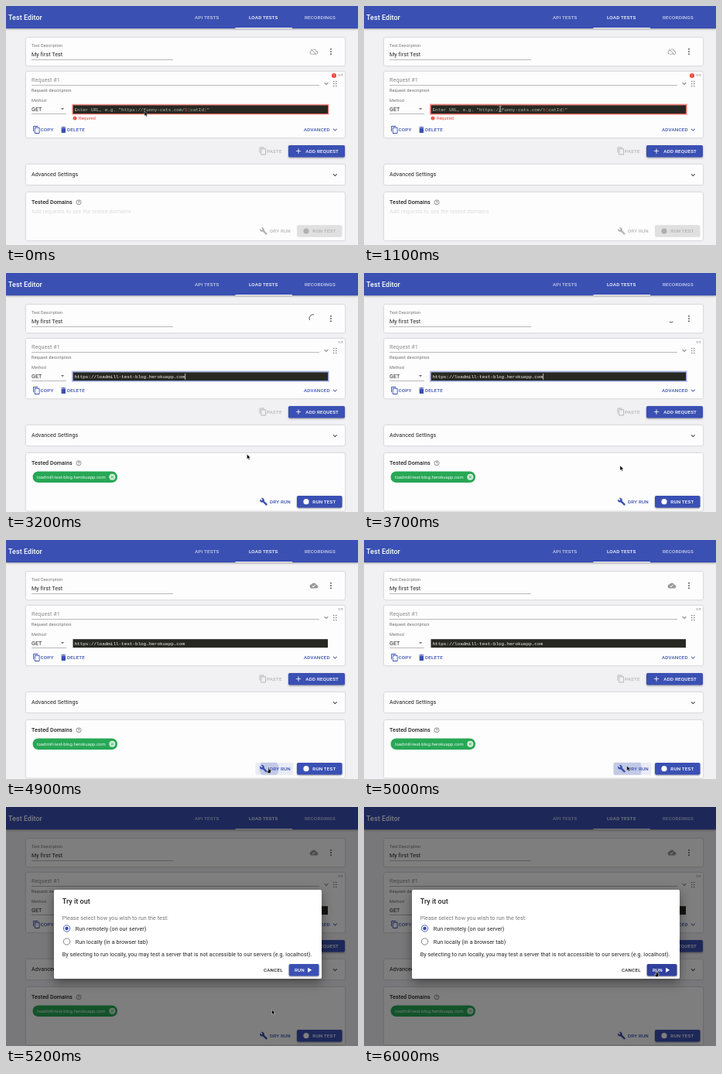
Write an HTML page that moves like this. It is 455 px wide and 309 px high and loops after 7000 ms.

```html
<!DOCTYPE html>
<html lang="en">
<head>
<meta charset="utf-8">
<title>Test Editor</title>
<style>
  html, body { margin: 0; width: 100%; height: 100%; overflow: hidden; background: #f1f0f3; }
  svg { display: block; width: 455px; height: 309px; }
  text { font-family: Roboto, Arial, sans-serif; white-space: pre; }
  .title { font-size: 8.95px; font-weight: 500; letter-spacing: .0075em; }
  .button { font-size: 6.26px; font-weight: 500; letter-spacing: .0286em; }
  .body { font-size: 7.14px; letter-spacing: .0094em; }
  .strong { font-weight: 500; }
  .label { font-size: 5.45px; letter-spacing: .0094em; }
  .caption { font-size: 5.45px; letter-spacing: .0333em; }
  .chip { font-size: 5.95px; }
  .tiny { font-size: 4.2px; }
  .code { font: 5.95px "Liberation Mono", "DejaVu Sans Mono", monospace; }
  .card { fill: #fdfdfd; filter: drop-shadow(0 .6px .8px rgba(0, 0, 0, .25)); }
  .raised { filter: drop-shadow(0 1px 1px rgba(0, 0, 0, .35)); }
  .dialog { fill: #fff; filter: drop-shadow(0 5px 7px rgba(0, 0, 0, .4)); }
</style>
</head>
<body>
<svg id="stage" viewBox="0 0 455 309"></svg>
<script>
const LOOP = 7000, STEP = 100;
const BLUE = '#3a50b3', INK = '#222', GREY = '#757575', PALE = '#b5b5b5', RED = '#ea4335';
const URL_TEXT = 'https://loadmill-test-blog.herokuapp.com';

const ICONS = {
  chevron: 'M16.6 8.6L12 13.2 7.4 8.6 6 10l6 6 6-6z',
  copy: 'M16 1H4c-1.1 0-2 .9-2 2v14h2V3h12V1zm3 4H8c-1.1 0-2 .9-2 2v14c0 1.1.9 2 2 2h11c1.1 0 2-.9 2-2V7c0-1.1-.9-2-2-2zm0 16H8V7h11v14z',
  trash: 'M6 19c0 1.1.9 2 2 2h8c1.1 0 2-.9 2-2V7H6v12zM19 4h-3.5l-1-1h-5l-1 1H5v2h14V4z',
  plus: 'M19 13h-6v6h-2v-6H5v-2h6V5h2v6h6v2z',
  play: 'M8 5v14l11-7z',
  drop: 'M7 10l5 5 5-5z',
  wrench: 'M22.7 19l-9.1-9.1c.9-2.3.4-5-1.5-6.9-2-2-5-2.4-7.4-1.3L9 6 6 9 1.6 4.7C.4 7.1.9 10.1 2.9 12.1c1.9 1.9 4.6 2.4 6.9 1.5l9.1 9.1c.4.4 1 .4 1.4 0l2.3-2.3c.5-.4.5-1.1.1-1.4z',
  cloudOff: 'M19.35 10.04C18.67 6.59 15.64 4 12 4c-1.48 0-2.85.43-4.01 1.17l1.46 1.46C10.21 6.23 11.08 6 12 6c3.04 0 5.5 2.46 5.5 5.5v.5H19c1.66 0 3 1.34 3 3 0 1.13-.64 2.11-1.56 2.62l1.45 1.45C23.16 18.16 24 16.68 24 15c0-2.64-2.05-4.78-4.65-4.96zM3 5.27l2.75 2.74C2.56 8.15 0 10.77 0 14c0 3.31 2.69 6 6 6h11.73l2 2L21 20.73 4.27 4 3 5.27zM7.73 10l8 8H6c-2.21 0-4-1.79-4-4s1.79-4 4-4h1.73z',
  cloudDone: 'M19.35 10.04C18.67 6.59 15.64 4 12 4 9.11 4 6.6 5.64 5.35 8.04 2.34 8.36 0 10.91 0 14c0 3.31 2.69 6 6 6h13c2.76 0 5-2.24 5-5 0-2.64-2.05-4.78-4.65-4.96zM10 17l-3.5-3.5 1.41-1.41L10 14.17 15.18 9l1.41 1.41L10 17z'
};

const text = (x, y, style, content, fill = INK) =>
  `<text x="${x}" y="${y}" class="${style}" fill="${fill}">${content}</text>`;
const rect = (x, y, w, h, fill, extra = '') =>
  `<rect x="${x}" y="${y}" width="${w}" height="${h}" fill="${fill}" ${extra}/>`;
const card = (y, h, id = '') =>
  `<rect ${id && `id="${id}"`} x="26" y="${y}" width="412" height="${h}" rx="1.8" class="card"/>`;
const line = (x, y, w) => rect(x, y, w, .6, '#8c8c8c');
const dot = (x, y, r, fill, extra = '') =>
  `<circle cx="${x}" cy="${y}" r="${r}" fill="${fill}" ${extra}/>`;
const ring = (x, y, r, stroke, width = .9) => dot(x, y, r, 'none', `stroke="${stroke}" stroke-width="${width}"`);
const icon = (name, x, y, fill, scale = .447) =>
  `<path d="${ICONS[name]}" fill="${fill}" transform="translate(${x} ${y}) scale(${scale}) translate(-12 -12)"/>`;
const group = (id, ...parts) => `<g id="${id}">${parts.join('')}</g>`;
const alert = (x, y, r) => dot(x, y, r, RED) + rect(x - .3, y - r * .55, .6, r * .65, '#fff') + rect(x - .3, y + r * .3, .6, .6, '#fff');

const header = [
  rect(0, 0, 455, 29, BLUE, 'class="raised"'),
  text(3, 18, 'title', 'Test Editor', '#fff'),
  text(244, 17, 'button', 'API TESTS', '#ccd1ea'),
  text(314, 17, 'button', 'LOAD TESTS', '#fff'),
  text(386, 17, 'button', 'RECORDINGS', '#ccd1ea'),
  rect(296.5, 28, 73.5, 1, '#fff')
].join('');

const description = [
  card(41, 36),
  text(33, 53, 'label', 'Test Description', GREY),
  text(33, 65, 'body', 'My first Test'),
  line(33, 69, 183),
  group('cloudOff', icon('cloudOff', 398, 59, '#999')),
  group('cloudDone', icon('cloudDone', 398, 59, '#999')),
  '<path id="spinner" fill="none" stroke="#555" stroke-width="1"/>',
  ...[-3.3, 0, 3.3].map(dy => dot(420, 59 + dy, .95, '#555'))
].join('');

const request = [
  card(85, 85, 'requestCard'),
  text(33, 98, 'body', 'Request #1', '#8b8b8b'),
  line(33, 102, 372),
  icon('chevron', 414, 100.3, GREY),
  ...[-3, 0, 3].map(dy => dot(423.8, 100.5 + dy, .8, GREY) + dot(426.8, 100.5 + dy, .8, GREY)),
  text(429.5, 91, 'tiny', '1/1', '#555'),
  text(33, 110.6, 'caption', 'Request description', '#666'),
  text(33, 123.5, 'label', 'Method', GREY),
  text(33, 135.5, 'body', 'GET'),
  icon('drop', 73, 133, GREY),
  line(33, 139, 45),
  '<rect id="glow" x="85.6" y="127.2" width="331.6" height="13" fill="none" stroke-width="1.6"/>',
  rect(86.5, 128.2, 329.5, 11, '#272822'),
  '<rect id="outline" x="86.2" y="127.9" width="330.2" height="11.6" fill="none" stroke-width=".8"/>',
  group('placeholder', text(88.5, 135.8, 'code',
    'Enter URL, e.g. "https://funny-cats.com/<tspan fill="#b0524f">${</tspan>catId<tspan fill="#b0524f">}</tspan>"', '#b9bbae')),
  group('url', text(88.5, 135.8, 'code', URL_TEXT, '#f4f4ee')),
  rect(0, 130, .7, 8, '#f8f8f0', 'id="caret"'),
  group('error', alert(424, 90, 3), alert(89, 145.2, 2.4), text(94, 147.2, 'label', 'Required', RED))
].join('');

const lower = group('lower',
  icon('copy', 39.5, 160, BLUE), text(44.5, 162.3, 'button', 'COPY', BLUE),
  icon('trash', 74.3, 160, BLUE), text(79, 162.3, 'button', 'DELETE', BLUE),
  text(385, 162.3, 'button', 'ADVANCED', BLUE), icon('chevron', 425.3, 160, BLUE),
  icon('copy', 332, 187.5, PALE), text(337, 189.8, 'button', 'PASTE', PALE),
  rect(365, 180, 73, 15.5, BLUE, 'rx="1.8" class="raised"'),
  icon('plus', 378, 187.6, '#fff'), text(387.3, 189.9, 'button', 'ADD REQUEST', '#fff'),
  card(205, 26), text(33, 220.4, 'body', 'Advanced Settings'), icon('chevron', 425.3, 218.5, INK),
  card(241, 62, 'domainsCard'),
  text(33, 256.3, 'body strong', 'Tested Domains'),
  ring(94, 253.8, 3, '#666', .7), text(92.7, 255.7, 'label', '?', '#555'),
  group('hint', text(33, 268.4, 'body', 'Add requests to see the tested domains', '#dcdcdc')),
  group('chip', rect(34.5, 264.5, 109.5, 14.5, '#27a755', 'rx="7.25"'),
    text(40, 273.8, 'chip', 'loadmill-test-blog.herokuapp.com', '#e8f8ec'),
    dot(137.3, 271.8, 4, '#d4eedc'),
    '<path d="M135.6 270.1l3.4 3.4m0-3.4l-3.4 3.4" stroke="#27a755" stroke-width=".9"/>')
);

const actions = group('actions',
  rect(322.5, 283, 49, 16, BLUE, 'id="hover" rx="1.8" opacity=".1"'),
  '<clipPath id="dryClip"><rect x="322.5" y="283" width="49" height="16" rx="1.8"/></clipPath>',
  `<g clip-path="url(#dryClip)">${dot(340, 291, 0, BLUE, 'id="ripple" opacity=".22"')}</g>`,
  group('dryRun', icon('wrench', 333, 291, 'currentColor'), text(341, 293.3, 'button', 'DRY RUN', 'currentColor')),
  rect(376, 283.2, 58.5, 15.5, BLUE, 'id="runBox" rx="1.8"'),
  group('runTest', dot(388, 291, 3.6, 'currentColor'), text(396.3, 293.3, 'button', 'RUN TEST', 'currentColor'))
);

const dialog = rect(0, 0, 455, 309, '#000', 'id="backdrop"') + group('dialog',
  '<rect x="62" y="107" width="346" height="115" rx="1.8" class="dialog"/>',
  text(72.7, 124.5, 'title', 'Try it out'),
  text(72.7, 146, 'body', 'Please select how you wish to run the test:', GREY),
  ring(78.5, 157, 4.2, BLUE), dot(78.5, 157, 2.3, BLUE),
  text(89.7, 159.7, 'body', 'Run remotely (on our server)'),
  ring(78.5, 174, 4.2, GREY), text(89.7, 176.6, 'body', 'Run locally (in a browser tab)'),
  text(72.7, 193, 'body', 'By selecting to run locally, you may test a server that is not accessible to our servers (e.g. localhost).'),
  text(333, 213, 'button', 'CANCEL'),
  rect(365.7, 203, 38.8, 15.5, BLUE, 'id="runButton" rx="1.8" class="raised"'),
  text(373, 213, 'button', 'RUN', '#fff'), icon('play', 392, 210.8, '#fff')
);

const cursors = [
  '<path id="arrow" d="M0 0V6.2L1.5 4.9 2.6 7.3 3.6 6.8 2.6 4.5H4.6Z" fill="#000" stroke="#fff" stroke-width=".4"/>',
  '<path id="beam" d="M-1.6-3.5Q0-3.5 0-2.5Q0-3.5 1.6-3.5M0-2.5V2.7M-1.6 3.7Q0 3.7 0 2.7Q0 3.7 1.6 3.7" fill="none" stroke="#ddd" stroke-width=".8"/>',
  '<path id="hand" d="M-.6 0Q0-.7.6 0V2.4L3 3V5L2.2 7.4H-.8L-2.4 4.6-1.9 4-.6 5Z" fill="#000" stroke="#fff" stroke-width=".5"/>'
].join('');

const stage = document.getElementById('stage');
stage.innerHTML = header + description + request + lower + actions + dialog + cursors;
const parts = Object.fromEntries([...stage.querySelectorAll('[id]')].map(el => [el.id, el]));

const set = (id, attributes) => {
  for (const name in attributes) parts[id].setAttribute(name, attributes[name]);
};
const show = (id, visible) => set(id, { display: visible ? 'inline' : 'none' });
const clamp = v => Math.max(0, Math.min(1, v));
const ease = v => v * v * (3 - 2 * v);

// time, x, y of the pointer tip
const POINTER = [
  [200, 179, 136], [500, 176, 133], [2500, 176, 133], [3400, 331, 249], [3700, 331, 249],
  [4300, 339.5, 294], [4900, 339.5, 294], [5100, 340, 290], [5200, 343.5, 262],
  [5500, 370, 219], [5800, 378, 212]
];

function pointerAt(t) {
  const next = POINTER.findIndex(p => p[0] > t);
  if (next === 0) return POINTER[0].slice(1);
  if (next < 0) return POINTER.at(-1).slice(1);
  const [a, b] = [POINTER[next - 1], POINTER[next]];
  const k = ease((t - a[0]) / (b[0] - a[0]));
  return [a[1] + (b[1] - a[1]) * k, a[2] + (b[2] - a[2]) * k];
}

function spinnerPath(t) {
  const phase = ((t - 2100) / 1400) % 1;
  const grow = ease(clamp(phase * 2)), shrink = ease(clamp(phase * 2 - 1));
  const start = phase + (15 * grow + 110 * shrink) / 127;
  const end = Math.min(start + grow * .787, phase + 1);
  const point = turn => `${397 + 5 * Math.cos(turn * 2 * Math.PI)} ${58.7 + 5 * Math.sin(turn * 2 * Math.PI)}`;
  return `M${point(start)}A5 5 0 ${end - start > .5 ? 1 : 0} 1 ${point(end)}`;
}

function draw(t) {
  const pasted = t >= 1700, valid = t >= 3100;
  const focused = t >= 700 && t < 4800;
  const saving = t >= 2300 && t < 3900;

  show('cloudOff', t < 2300);
  show('spinner', saving);
  show('cloudDone', t >= 3900);
  if (saving) set('spinner', { d: spinnerPath(t) });

  show('placeholder', !pasted);
  show('url', pasted);
  show('error', !valid);
  show('caret', (t >= 700 && t < 1100) || (pasted && t < 4100));
  set('caret', { x: pasted ? 231.4 : 88.4 });
  show('outline', !valid || focused);
  show('glow', !valid || focused);
  set('outline', { stroke: valid ? '#7f93d6' : '#e2473c' });
  set('glow', { stroke: valid ? '#c5cdee' : '#f3b5b0', opacity: focused ? .9 : .45 });

  set('requestCard', { height: valid ? 77 : 85 });
  set('lower', { transform: `translate(0 ${valid ? -8 : 0})` });
  set('domainsCard', { height: valid ? 74.5 : 62 });
  show('hint', !valid);
  show('chip', valid);
  set('actions', { transform: `translate(0 ${valid ? 4.7 : 0})` });
  set('dryRun', { color: valid ? BLUE : PALE });
  set('runTest', { color: valid ? '#fff' : '#b0b0b0' });
  set('runBox', { fill: valid ? BLUE : '#e0e0e0', class: valid ? 'raised' : '' });

  show('hover', t >= 4300 && t < 5200);
  show('ripple', t >= 4800 && t < 5200);
  set('ripple', { r: 6 + Math.max(0, t - 4800) * .065 });

  const fade = clamp((t - 5000) / 200) ** 1.6;
  set('backdrop', { opacity: fade * .5 });
  set('dialog', { opacity: fade });
  set('runButton', { fill: t >= 6000 ? '#30409c' : BLUE });

  const [x, y] = pointerAt(t);
  const shape = t >= 6000 || (t >= 4300 && t < 5000) ? 'hand' : t >= 500 && t < 2700 ? 'beam' : 'arrow';
  for (const id of ['arrow', 'beam', 'hand']) show(id, id === shape);
  set(shape, { transform: `translate(${x} ${y})` });
}

const began = performance.now();
function tick() {
  const t = (performance.now() - began) % LOOP;
  draw(Math.floor(t / STEP) * STEP);
  requestAnimationFrame(tick);
}
tick();
</script>
</body>
</html>
```
